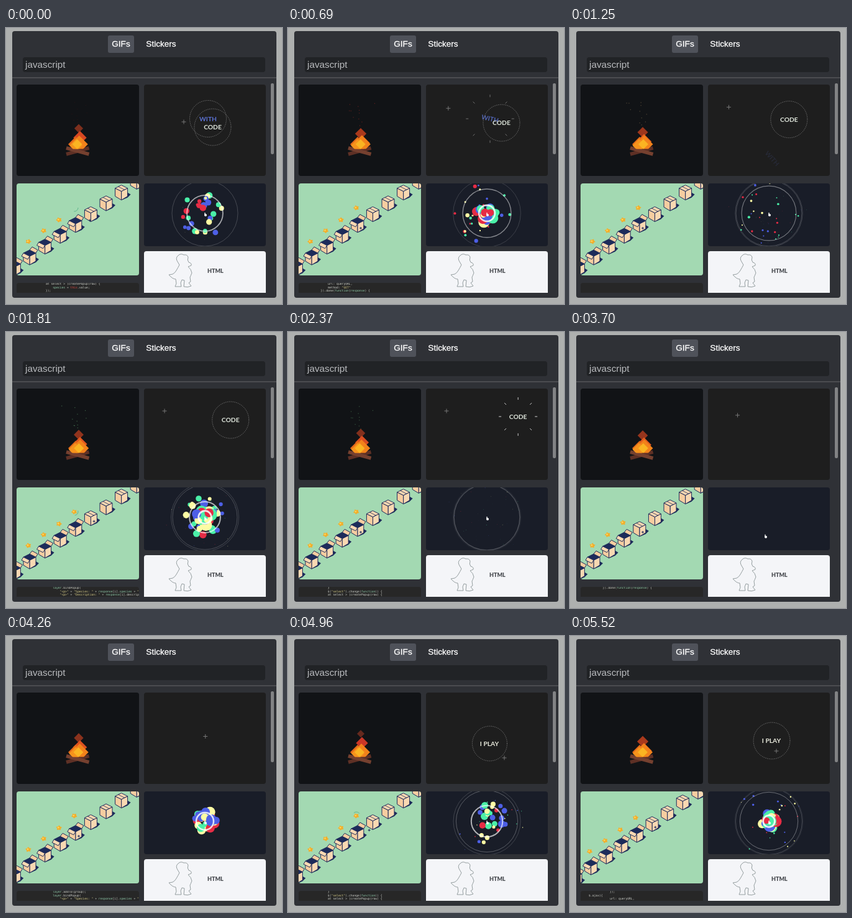
Recreate the animation shown at these times as an HTML page with a canvas. Size 444 by 444 pixels, loop 5.59 s.

```html
<!DOCTYPE html>
<html lang="en">
<head>
<meta charset="utf-8">
<title>Picker</title>
<style>
html, body { margin: 0; width: 100%; height: 100%; overflow: hidden; background: #aeb0af; }
body { position: relative; font-family: "Liberation Sans", Arial, sans-serif; }
body > * { position: absolute; }
.panel { left: 10px; top: 5px; width: 425px; height: 429px; border-radius: 4px; background: #2f3136; }
.tab { top: 12px; height: 28px; line-height: 27px; font-size: 13.6px; color: #fff; text-align: center;
  border-radius: 3px; -webkit-text-stroke: .3px #fff; }
.on { left: 164px; width: 42px; background: #4f525a; }
.off { left: 219px; width: 61px; }
.search { left: 27px; top: 47px; width: 386px; height: 24px; padding-left: 4px; line-height: 24px;
  font-size: 15.3px; color: #b9bbbe; background: #212326; border-radius: 4px; }
.rule { left: 10px; top: 79px; width: 425px; height: 2px; background: #4b4c50; }
.bar { left: 426px; top: 89px; width: 5px; height: 114px; border-radius: 2px; background: #828385; }
canvas { left: 0; top: 0; }
</style>
</head>
<body>
<div class="panel"></div>
<div class="tab on">GIFs</div>
<div class="tab off">Stickers</div>
<div class="search">javascript</div>
<div class="rule"></div>
<div class="bar"></div>
<canvas width="444" height="444"></canvas>
<script>
const LOOP = 5590, STEP = 70, TAU = Math.PI * 2;
const ctx = document.querySelector('canvas').getContext('2d');
const frac = v => v - Math.floor(v);
const clamp = v => Math.max(0, Math.min(1, v));
const ramp = (t, start, length) => clamp((t - start) / length);

function random(seed) {
  let s = seed * 7919 + 17;
  return () => (s = (s * 16807) % 2147483647) / 2147483647;
}
function mix(a, b, p) {
  return `rgb(${a.map((v, i) => Math.round(v + (b[i] - v) * p))})`;
}
function poly(points, fill, stroke, width = 1) {
  ctx.beginPath();
  points.forEach(([x, y]) => ctx.lineTo(x, y));
  ctx.closePath();
  if (fill) { ctx.fillStyle = fill; ctx.fill(); }
  if (stroke) { ctx.strokeStyle = stroke; ctx.lineWidth = width; ctx.stroke(); }
}
function line(x1, y1, x2, y2, color, width = 1) {
  ctx.strokeStyle = color;
  ctx.lineWidth = width;
  ctx.beginPath();
  ctx.moveTo(x1, y1);
  ctx.lineTo(x2, y2);
  ctx.stroke();
}
function cross(x, y, r, color) {
  line(x - r, y, x + r, y, color);
  line(x, y - r, x, y + r, color);
}
function circle(x, y, r) {
  ctx.beginPath();
  ctx.arc(x, y, r, 0, TAU);
}
function disc(x, y, r, fill) {
  circle(x, y, r);
  ctx.fillStyle = fill;
  ctx.fill();
}
function diamond(x, y, r, fill) {
  poly([[x, y - r], [x + r, y], [x, y + r], [x - r, y]], fill);
}
function tile(x, y, w, h, color, draw, t, radii = 4) {
  ctx.save();
  ctx.beginPath();
  ctx.roundRect(x, y, w, h, radii);
  ctx.clip();
  ctx.fillStyle = color;
  ctx.fillRect(x, y, w, h);
  draw(t);
  ctx.restore();
}

// Campfire
function sparks(t) {
  const rnd = random(5);
  ctx.fillStyle = mix([150, 35, 30], [65, 105, 75], ramp(t, 600, 1000));
  ctx.globalAlpha = .15 + .8 * Math.sin(Math.PI * ramp(t, 0, 3400)) - .15 * ramp(t, 2400, 1000);
  for (let i = 0; i < 11; i++) {
    const p = frac(rnd() + t / 1900), dx = (rnd() - .5) * 58;
    ctx.fillRect(115 + dx * p, 160 - 42 * p, 1.2, 1.2);
  }
  ctx.globalAlpha = 1;
}
function fire(t) {
  const u = 2.06 + (t - 690) / 482, f = frac(u), sway = Math.sin(u * TAU);
  sparks(t);
  line(97, 203, 133.5, 193, '#5e3025', 5.5);
  line(97, 193, 133.5, 203, '#75402f', 5.5);
  ctx.save();
  ctx.beginPath();
  ctx.rect(90, 90, 50, 104.5);
  ctx.clip();
  for (const k of [1, 0]) {
    const p = (f + k) / 2;
    const color = k ? mix([175, 58, 28], [95, 40, 30], f) : mix([240, 110, 25], [200, 50, 40], f);
    diamond(119 - 2 * k, 186 - 30 * p, 13 - 7.3 * p, color);
  }
  diamond(112, 187, 12, '#e56a19');
  diamond(118.5 + sway, 187, 14, '#f2821b');
  diamond(112 - sway, 189, 10.5, '#f6931c');
  diamond(116 + sway * 2, 187, 8, '#fab422');
  ctx.restore();
}

// Words in dotted rings
function word(text, x, y, color, angle = 0) {
  ctx.save();
  ctx.translate(x, y);
  ctx.rotate(angle);
  ctx.font = '700 10.3px Lato, sans-serif';
  ctx.textAlign = 'center';
  ctx.fillStyle = color;
  ctx.fillText(text, 0, 3.5);
  ctx.restore();
}
function ring(x, y, r) {
  ctx.setLineDash([1.4, 1.5]);
  circle(x, y, r);
  ctx.strokeStyle = '#828282';
  ctx.lineWidth = .9;
  ctx.stroke();
  ctx.setLineDash([]);
}
// The word sits in its ring until `pop`, then the ring bursts and the word tumbles.
function bubble(text, x, y, color, t, pop) {
  const age = t - pop;
  if (age < 0) {
    ring(x, y, 29.5);
    return word(text, x, y, color);
  }
  const p = clamp(age / 400), r = 41 - 10 * (1 - p) ** 2;
  ctx.globalAlpha = 1 - p;
  for (let i = 0; i < 8; i++) {
    const c = Math.cos(i * TAU / 8), s = Math.sin(i * TAU / 8);
    line(x + c * (r - 4), y + s * (r - 4), x + c * r, y + s * r, '#d0d0d0');
  }
  ctx.globalAlpha = clamp(1.1 - age / 800);
  word(text, x, y - .03 * age + .000147 * age * age, color, age * .0011);
  ctx.globalAlpha = 1;
}
function words(t) {
  const drift = Math.min(t, 2370);
  bubble('WITH', 325, 146, '#5c72d2', t, 480);
  bubble('CODE', 332.5 + drift / 63, 159.5 - drift / 101, '#dfe6dc', t, 2370);
  if (t > 4400) {
    const y = 173 - (t - 4960) / 124;
    ring(324.5, y, 29.5 * (1 - Math.exp((4400 - t) / 190)));
    ctx.globalAlpha = ramp(t, 4400, 250);
    word('I PLAY', 324, y, '#e8e9dc');
    ctx.globalAlpha = 1;
  }
  const settle = Math.exp(-t / 290), sweep = ramp(t, 3560, 1400), back = ramp(t, 4960, 560);
  cross(255 + 31 * settle + 93 * Math.sin(sweep * TAU / 4) - 16 * back,
    127 + 24 * settle + 69 * sweep - 11 * back, 3.5, '#777');
}

// Conveyor of boxes
const INK = '#1d2b5a', CARD = '#f6cda0', LIGHT = '#f9d8b2';

function box(x, y, open) {
  ctx.save();
  ctx.translate(x, y);
  poly([[10, 0], [15, 3], [10, 8], [1, 12]], INK);
  poly([[0, -2], [10, -7], [10, 6], [0, 12]], LIGHT, INK);
  poly([[0, -2], [-10, -7], [-10, 6], [0, 12]], CARD, INK);
  poly([[0, -12], [10, -7], [0, -2], [-10, -7]], open ? INK : LIGHT, INK);
  if (open) {
    poly([[0, -12], [10, -7], [13, -12], [4, -17]], CARD, INK);
    poly([[-10, -7], [0, -2], [-3, 3], [-13, -2]], LIGHT, INK);
  } else {
    line(-5, -9.5, 5, -4.5, INK, .8);
  }
  ctx.restore();
}
function nugget(x, y, angle) {
  const points = [];
  for (let i = 0; i < 10; i++) {
    const a = angle + i * TAU / 10, r = i % 2 ? 3.2 : 5;
    points.push([x + r * Math.cos(a), y + .85 * r * Math.sin(a)]);
  }
  poly(points, '#f2ae2a');
  disc(x - 1, y - .5, 1.4, '#fbd45c');
}
function belt(t) {
  const age = (t + 1340) % 1680, left = (1 - ramp(age, 0, 280)) ** 2.5;
  const at = (i, x, y) => [x + 24.6 * (i - left), y - 17.4 * (i - left)];
  for (let i = 9; i >= -1; i--) box(...at(i, 13.4, 386.5), i < 5);
  const flipping = age > 1050, hidden = flipping && Math.floor(age / 110) % 2 === 0;
  for (let i = 0; i < 4; i++) {
    const [x, y] = at(i, 36, 343.5);
    if (i < 3 || !hidden) nugget(x, i < 3 ? y : y - 2, Math.sin(t / 420 + i) * .6);
  }
  if (flipping) {
    ctx.strokeStyle = '#5fb58c';
    ctx.lineWidth = 1;
    ctx.beginPath();
    ctx.arc(110, 289, 6, t / 300, t / 300 + 1.7);
    ctx.stroke();
  }
  const ride = age < 280 ? 1 - left : ramp(age, 1000, 470);
  cross(117 + 24.6 * ride, 322 - 17.4 * ride, 2, INK);
}

// Click fireworks
const clicks = [-624, -140, 459, 640, 950, 1264, 1697, 1771];
for (let c = 4205; c < LOOP; c += 320) clicks.push(c);
const palette = ['#e62c45', '#4af0a8', '#4d5fe6', '#fdfca4'];

function burst(age, seed) {
  const rnd = random(seed), x = 320, y = 298;
  for (let i = 0; i < 28; i++) {
    const angle = rnd() * TAU, reach = 12 + rnd() * 56, size = 5 + rnd() * 7;
    const life = 1050 + rnd() * 250, color = palette[Math.floor(rnd() * 4)];
    if (age >= life) continue;
    const left = 2 ** (-10 * age / life), d = reach * (1 - left);
    disc(x + Math.cos(angle) * d, y + Math.sin(angle) * d, size * left, color);
  }
  const e = 1 - 2 ** (-10 * age / 1300);
  circle(x, y, 55 * e);
  ctx.globalAlpha = (1 - .75 * e) * clamp((1300 - age) / 500);
  ctx.strokeStyle = '#fff';
  ctx.lineWidth = .6 + 2.6 * (1 - e);
  ctx.stroke();
  ctx.globalAlpha = 1;
}
function fireworks(t) {
  clicks.forEach((c, i) => {
    if (t >= c && t < c + 1300) burst(t - c, i + 3);
  });
  const away = ramp(t, 2400, 740) - ramp(t, 3500, 600);
  const x = 321 - 9 * away, y = 300 + 43 * away;
  line(x - 1, y - 3, x - 1, y + 1, '#fff', 1.3);
  disc(x, y + 1, 2, '#fff');
}

// Line drawing
const figure = new Path2D(`M276 376 Q272 370 277 366 Q281 362 286 365 Q292 364 293 369 Q291 373 294 377
  Q299 378 298 382 L293 384 Q298 388 299 394 Q297 399 296 401 L297 408 L294 410 L298 415 Q292 418 286 416
  L287 406 L283 405 L281 410 L282 416 L272 416 L274 411 L273 404 Q268 404 262 397 L268 396
  Q272 394 274 390 Q277 385 279 381 Z`);
function sketch() {
  ctx.strokeStyle = '#8b9596';
  ctx.lineWidth = .9;
  ctx.stroke(figure);
  ctx.font = '900 9px Lato, sans-serif';
  ctx.textAlign = 'left';
  ctx.fillStyle = '#4a4d52';
  ctx.fillText('HTML', 324, 394);
}

// Scrolling listing
const listing = `$.ajax({
            url: queryURL,
            method: "GET"
        }).done(function(response) {



                layer.addTo(group);
                layer.bindPopup(
                    "<p>" + "Species: " + response[i].species + "</p>"
                    "<p>" + "Description: " + response[i].description
            }
            $("select").change(function() {
            at select > (createPopup(row) {
                species = this.value;
            });`.split('\n');
function tint(token) {
  if (token[0] === '"') return '#d9cf8a';
  if (token === 'this') return '#e0483e';
  return /^(function|layer|species|response)$/.test(token) ? '#93cfae' : '#cfd2cc';
}
function code(t) {
  const top = Math.floor(13 + t / 162);
  ctx.font = '4.7px "DejaVu Sans Mono", monospace';
  ctx.textAlign = 'left';
  for (let row = 0; row < 4; row++) {
    let x = 30;
    for (const token of listing[(top + row) % listing.length].match(/"[^"]*"|\w+|[^\w"]+/g) || []) {
      ctx.fillStyle = tint(token);
      ctx.fillText(token, x, 413 + row * 5.7);
      x += token.length * 2.83;
    }
  }
}

function frame() {
  // Pictures hold for one step; the first hold is 10 ms short.
  const now = performance.now() % LOOP;
  const t = Math.max(0, Math.floor((now + 10) / STEP) * STEP - 10);
  ctx.clearRect(0, 0, 444, 444);
  tile(17, 91, 197, 147, '#111316', fire, t);
  tile(222, 91, 196, 147, '#1e1e1e', words, t);
  tile(17, 250, 197, 148, '#a3d9b2', belt, t);
  tile(222, 250, 196, 101, '#191d28', fireworks, t);
  tile(222, 359, 196, 67, '#f4f5f8', sketch, t, [4, 4, 0, 0]);
  tile(17, 410, 197, 16, '#272727', code, t, [4, 4, 0, 0]);
  requestAnimationFrame(frame);
}
frame();
</script>
</body>
</html>
```
